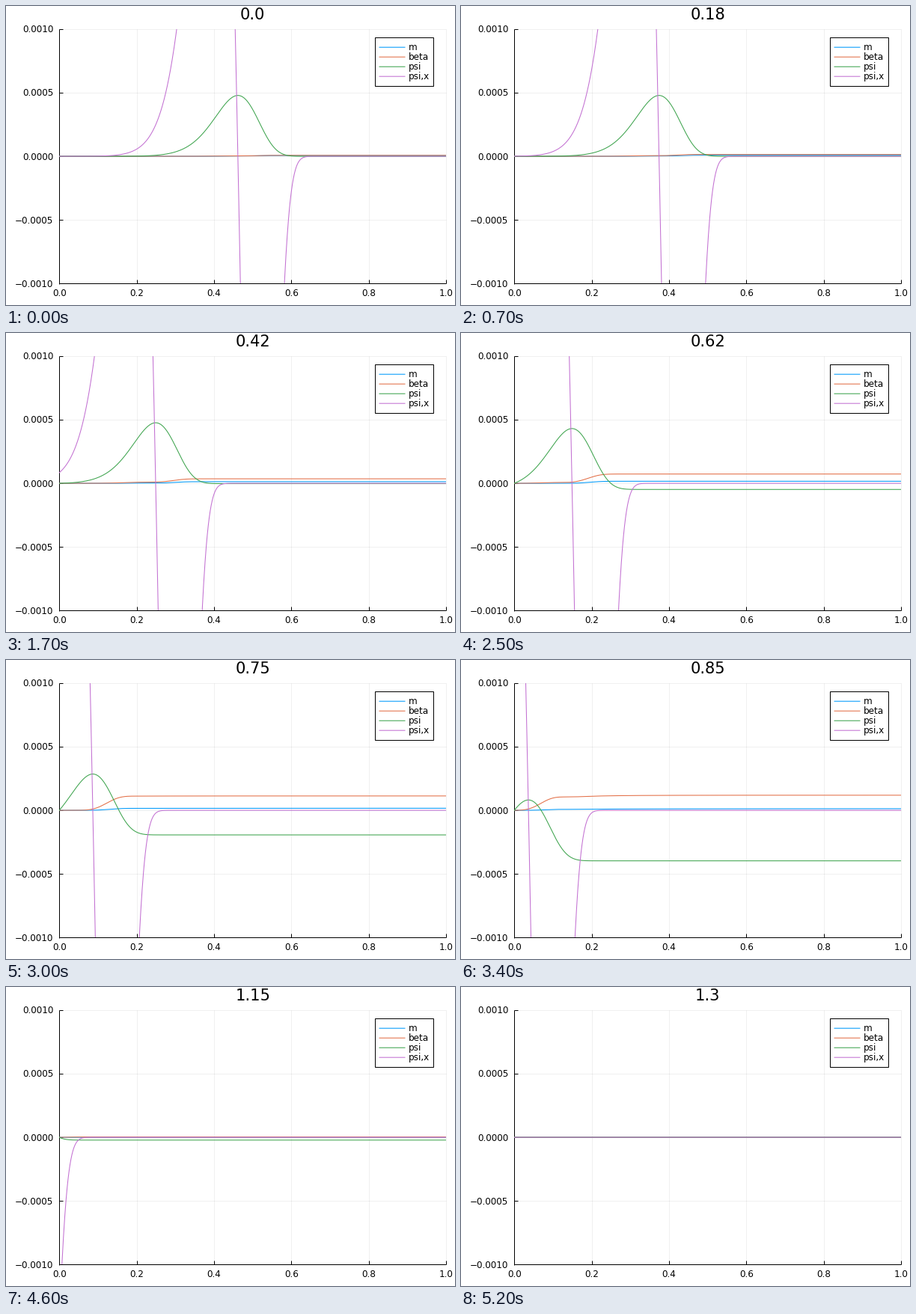
Animation, 600 px wide and 400 px high, one loop 5300 ms. Source, as a matplotlib script:

```python
import numpy as np
import matplotlib.pyplot as plt
from matplotlib.animation import FuncAnimation
from matplotlib.patches import Rectangle

W, H, DPI = 600, 400, 100
PX = 72 / DPI                      # one pixel in points
FRAMES, INTERVAL, DT = 53, 100, 0.025
LEFT, RIGHT, TOP, BOTTOM = 71.2, 588.2, 30.9, 371.3
Y_MAX = 0.001
SERIES = [("m", "#009AFA"), ("beta", "#E36F47"),
          ("psi", "#3EA44E"), ("psi,x", "#C371D2")]

plt.rcParams["font.family"] = "DejaVu Sans"
fig = plt.figure(figsize=(W / DPI, H / DPI), dpi=DPI, facecolor="white")
ax = fig.add_axes([0, 0, 1, 1])
ax.set_xlim(0, W)
ax.set_ylim(H, 0)
ax.axis("off")


def sx(x):
    return LEFT + (RIGHT - LEFT) * x


def sy(y):
    return (TOP + BOTTOM) / 2 - (BOTTOM - TOP) / 2 * y / Y_MAX


def line(x0, y0, x1, y1, color="black", width=1.0, **kw):
    ax.plot([x0, x1], [y0, y1], color=color, lw=width * PX,
            solid_capstyle="butt", **kw)


def label(x, y, text, size=12, ha="center", **kw):
    return ax.text(x, y, text, fontsize=size * PX, ha=ha, va="baseline", **kw)


# Grid, axes and tick labels
x_ticks = np.linspace(0, 1, 6)
y_ticks = np.linspace(-Y_MAX, Y_MAX, 5)
for v in x_ticks:
    line(sx(v), TOP, sx(v), BOTTOM, alpha=0.06, zorder=1)
    line(sx(v), BOTTOM, sx(v), BOTTOM - 5, zorder=2)
    label(sx(v), 388, f"{v:.1f}")
for v in y_ticks:
    line(LEFT, sy(v), RIGHT, sy(v), alpha=0.06, zorder=1)
    line(LEFT, sy(v), LEFT + 5, sy(v), zorder=2)
    label(63.3, sy(v) + 4.4, f"{v:.4f}".replace("-", "\u2212"), ha="right")
line(LEFT, TOP, LEFT, BOTTOM + 0.5, zorder=2)
line(LEFT - 0.5, BOTTOM, RIGHT, BOTTOM, zorder=2)
title = label((LEFT + RIGHT) / 2, 18.2, "", size=21)

# Curves, clipped to the plot area
area = Rectangle((LEFT, TOP), RIGHT - LEFT, BOTTOM - TOP,
                 transform=ax.transData)
curves = []
for _, color in SERIES:
    curve, = ax.plot([], [], color=color, lw=1.05 * PX, zorder=3, snap=False)
    curve.set_clip_path(area)
    curves.append(curve)

# Legend
ax.add_patch(Rectangle((493, 42), 78, 65, facecolor="white",
                       edgecolor="black", lw=PX, zorder=4))
for k, (name, color) in enumerate(SERIES):
    y = 55.2 + 13 * k
    line(498.5, y, 533.5, y, color, 1.05, zorder=5, snap=False)
    label(537.6, y + 4.2, name, ha="left", zorder=5)

x = np.linspace(0, 1, 1201)


def pulse(s):
    """Ingoing profile and its slope, in the compact radius s = r / (1 + r)."""
    s = np.clip(s, 1e-9, 0.99)
    r = s / (1 - s)
    f = 1e-3 * r**3 * np.exp(-((r - 0.7) / 0.3) ** 2)
    slope = f * (3 / r - 2 * (r - 0.7) / 0.09) / (1 - s) ** 2
    return f, slope


def integrate(g):
    steps = (g[1:] + g[:-1]) / 2 * np.diff(x)
    return np.concatenate([[0], np.cumsum(steps)])


def fields(t):
    f, psi_x = pulse(x + t / 2)
    psi = f - pulse(t / 2)[0]
    beta_x, m_x = np.zeros_like(x), np.zeros_like(x)
    s = x[1:]
    phi_x = psi_x[1:] * (1 - s) / s - psi[1:] / s**2
    beta_x[1:] = 2 * np.pi * s * (1 - s) * phi_x**2
    m_x[1:] = 2 * np.pi * s**2 * phi_x**2
    return integrate(m_x), integrate(beta_x), psi, psi_x


def draw(i):
    for curve, values in zip(curves, fields(i * DT)):
        curve.set_data(sx(x), sy(values))
    title.set_text(str(round(i * 2.5) / 100))   # ties round to even
    return [*curves, title]


anim = FuncAnimation(fig, draw, frames=FRAMES, interval=INTERVAL,
                     repeat=True, repeat_delay=0, blit=False)
plt.show()
```
